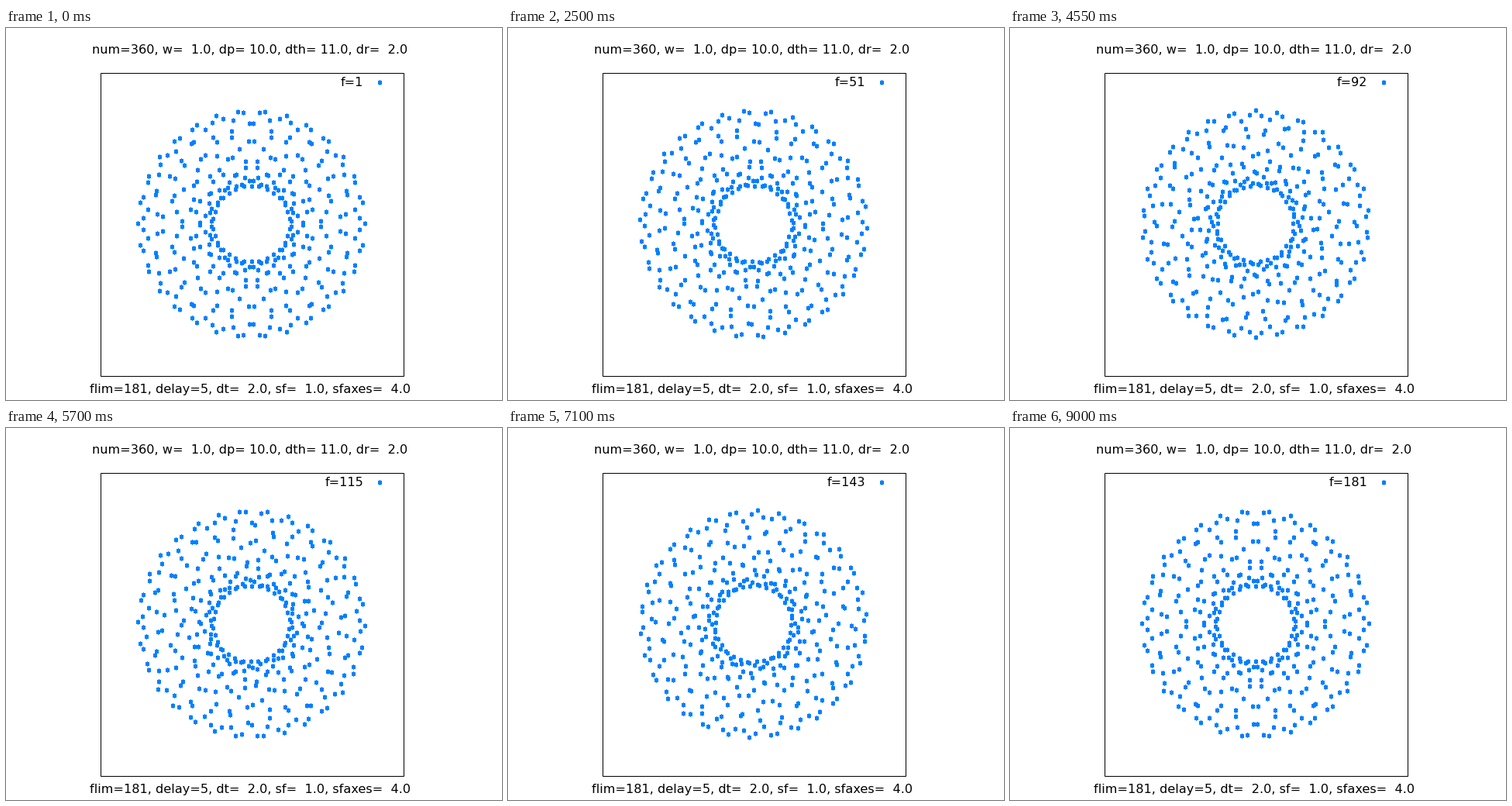
A matplotlib script for the animation above (9.05 s loop, 640 px wide and 480 px high).

```python
import numpy as np
import matplotlib.pyplot as plt
from matplotlib.animation import FuncAnimation
from matplotlib.collections import PolyCollection
from matplotlib.patches import Rectangle

W, H, DPI = 640, 480, 100
NUM, DP, DTH, DR, DT = 360, 10, 11, 2, 2
FRAMES, DELAY = 181, 50
BLUE = "#0080ff"
LEFT, TOP, SIDE = 121, 57, 391
SCALE = SIDE / 8          # axes run from -4 to 4

plt.rcParams["font.family"] = "DejaVu Sans"
fig = plt.figure(figsize=(W / DPI, H / DPI), dpi=DPI, facecolor="white")
ax = fig.add_axes([0, 0, 1, 1])
ax.set_xlim(0, W)
ax.set_ylim(H, 0)
ax.axis("off")


def label(x, y, text, px=16.0):
    return ax.text(x, y, text, fontsize=px * 72 / DPI, color="black",
                   ha="left", va="baseline")


label(110.7, 33, "num=360, w=  1.0, dp= 10.0, dth= 11.0, dr=  2.0", 16.12)
label(107.7, 471, "flim=181, delay=5, dt=  2.0, sf=  1.0, sfaxes=  4.0", 16.1)
counter = label(432, 75, "f=1")
ax.add_patch(Rectangle((LEFT + 0.5, TOP + 0.5), SIDE, SIDE, fill=False,
                       edgecolor="black", linewidth=72 / DPI))

# 5 x 7 pixel dot: a square body with a nub above and below
DOT = np.array([(-2, -2), (0, -2), (0, -3), (1, -3), (1, -2), (3, -2),
                (3, 3), (1, 3), (1, 4), (0, 4), (0, 3), (-2, 3)])
KEY = np.array([[482, 70]])

dots = PolyCollection([], facecolors=BLUE, edgecolors="none", linewidths=0,
                      antialiaseds=False)
ax.add_collection(dots, autolim=False)

index = np.arange(NUM)
theta = np.radians(index * DTH % 360)


def positions(t):
    """Pixel of every dot; each swings along its own fixed ray."""
    r = DR + np.cos(np.radians((index * DP + t) % 360))
    x = LEFT + SIDE / 2 + SCALE * r * np.cos(theta)
    y = H - 1 - TOP - SIDE / 2 + SCALE * r * np.sin(theta)
    px = np.floor(x + 0.5 + 1e-9)
    py = H - 1 - np.floor(y + 0.5 + 1e-9)
    return np.column_stack([px, py])


def update(k):
    spots = np.vstack([positions(k * DT), KEY])
    dots.set_verts(spots[:, None, :] + DOT)
    text = str(k + 1)
    counter.set_text("f=" + text)
    counter.set_x(442.2 - 10.18 * len(text))
    return dots, counter


anim = FuncAnimation(fig, update, frames=FRAMES, init_func=lambda: update(0),
                     interval=DELAY, repeat=True, repeat_delay=0, blit=False)
plt.show()
```
